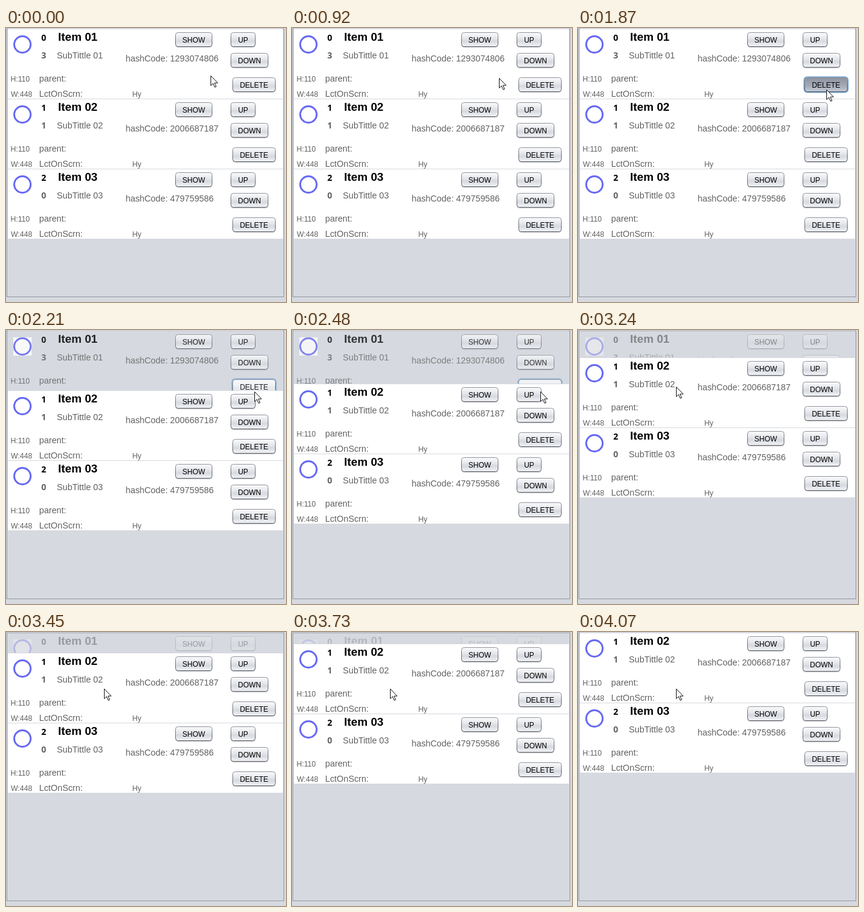
Write an HTML page that moves like this. It is 460 by 450 pixels and loops after 4.93 s.

```html
<!DOCTYPE html>
<html lang="en">
<head>
<meta charset="utf-8">
<title>List row removal</title>
<style>
  html, body { margin: 0; width: 100%; height: 100%; overflow: hidden; background: #d6d9df; }
  svg { display: block; }
  text { font: 14.3px "Liberation Sans", Arial, sans-serif; fill: #616161; white-space: pre; }
  .title { font-size: 18.8px; font-weight: bold; fill: #000; }
  .num { font: bold 14px "Open Sans", sans-serif; text-anchor: middle; }
  .dark { fill: #000; }
  .small { font-size: 12.2px; }
  .label { font-size: 12px; fill: #000; text-anchor: middle; }
  .face { fill: url(#normal); stroke: url(#edge); }
  .ring { fill: none; stroke: #73a4d1; stroke-width: 2; visibility: hidden; }
  .hover .face { fill: url(#light); }
  .pressed .face { fill: url(#dark); }
  .focus .ring { visibility: visible; }
</style>
</head>
<body>
<svg width="460" height="450" viewBox="0 0 460 450">
  <defs>
    <linearGradient id="normal" x2="0" y2="1">
      <stop stop-color="#fbfbfc"/><stop offset=".4" stop-color="#e6e8ec"/>
      <stop offset=".62" stop-color="#d6d9df"/><stop offset="1" stop-color="#f3f5f8"/>
    </linearGradient>
    <linearGradient id="light" x2="0" y2="1">
      <stop stop-color="#fff"/><stop offset=".4" stop-color="#f5f6f8"/>
      <stop offset=".62" stop-color="#e8eaee"/><stop offset="1" stop-color="#fff"/>
    </linearGradient>
    <linearGradient id="dark" x2="0" y2="1">
      <stop stop-color="#8d939f"/><stop offset=".6" stop-color="#a4abb8"/>
      <stop offset="1" stop-color="#c6ccd6"/>
    </linearGradient>
    <linearGradient id="edge" x2="0" y2="1">
      <stop stop-color="#90949d"/><stop offset="1" stop-color="#53565d"/>
    </linearGradient>
  </defs>
  <rect width="460" height="450" fill="#d6d9df"/>
  <rect x="1.5" y="1.5" width="455" height="440" fill="none" stroke="#9297a1"/>
  <g id="removed"></g>
  <g id="rest"></g>
  <path id="cursor" d="M.5.5V16.5L4.2 13 7 19.3 9.3 18.3 6.6 12.2H11.8Z" fill="#fff" stroke="#111"/>
</svg>
<script>
const LOOP = 4930, ROW = 115, REMOVE_STEP = 14;
const $ = id => document.getElementById(id);

const text = (cls, x, y, s) => `<text class="${cls}" x="${x}" y="${y}">${s}</text>`;

const button = (label, x, y, w) => `<g class="${label}">
  <rect x="${x + 1}" y="${y + 1.5}" width="${w - 2}" height="24" rx="4" fill="#8a8e96" opacity=".35"/>
  <rect class="ring" x="${x - .5}" y="${y - .5}" width="${w + 1}" height="25" rx="5"/>
  <rect class="face" x="${x + .5}" y="${y + .5}" width="${w - 1}" height="23" rx="4"/>
  ${text('label', x + w / 2, y + 17, label)}</g>`;

const row = (i, count, hash) => `<g transform="translate(0 ${2 + ROW * i})">
  <rect x="3" y="-1" width="452" height="1" fill="#d6d9df"/>
  <rect class="back" x="3" width="452" height="114" fill="#fff"/>
  <rect x="12" y="10" width="30" height="30" fill="#fff"/>
  <circle cx="27" cy="25" r="13.5" fill="none" stroke="#6669f2" stroke-width="3"/>
  ${text('num dark', 62, 19, i)}
  ${text('num', 62, 48, count)}
  ${text('title', 85.6, 19, 'Item 0' + (i + 1))}
  ${text('', 83.5, 48, 'SubTittle 0' + (i + 1))}
  ${text('', 196.5, 53, 'hashCode: ' + hash)}
  ${text('small', 7.5, 86, 'H:110')}
  ${text('', 54.5, 86, 'parent:')}
  ${text('small', 8, 111, 'W:448')}
  ${text('', 54.5, 111, 'LctOnScrn:')}
  ${text('small', 207.5, 111, 'Hy')}
  ${button('SHOW', 278, 5, 61)}${button('UP', 369, 5, 41)}
  ${button('DOWN', 369, 39, 62)}${button('DELETE', 372, 79, 71)}</g>`;

$('removed').innerHTML = row(0, 3, 1293074806);
$('rest').innerHTML = row(1, 1, 2006687187) + row(2, 0, 479759586);
const back = document.querySelector('#removed .back');
const deleteButton = document.querySelector('#removed .DELETE');
const showButton = document.querySelector('#rest .SHOW');

// Pointer stops: step, x, y
const stops = [[-1, 336, 78], [0, 340, 82], [5, 403, 103], [7, 403, 103],
  [8, 408, 101], [23, 408, 101], [27, 330, 101], [31, 161, 93]];

function pointerAt(step) {
  const next = stops.findIndex(s => s[0] > step);
  if (next < 0) return stops.at(-1).slice(1);
  if (next === 0) return stops[0].slice(1);
  const [a, b] = [stops[next - 1], stops[next]];
  const p = (step - a[0]) / (b[0] - a[0]);
  return [1, 2].map(i => Math.round(a[i] + (b[i] - a[i]) * p));
}

function draw(now) {
  const step = Math.floor((now % LOOP - 909) / 68.48);
  const removing = step - REMOVE_STEP;
  const shift = Math.min(ROW, Math.max(0, Math.floor(3.63 * removing - 1)));
  const [x, y] = pointerAt(step);

  $('rest').setAttribute('transform', `translate(0 ${-shift})`);
  $('removed').setAttribute('opacity', 1 - shift / ROW);
  back.setAttribute('visibility', removing > 0 ? 'hidden' : 'visible');
  deleteButton.setAttribute('class', removing > 0 ? 'hover focus' : removing === 0 ? 'pressed focus' : x >= 372 ? 'hover' : '');
  showButton.setAttribute('class', x >= 278 && x < 339 && removing > 0 ? 'hover' : '');
  $('cursor').setAttribute('transform', `translate(${x} ${y})`);
  requestAnimationFrame(draw);
}
requestAnimationFrame(draw);
</script>
</body>
</html>
```
